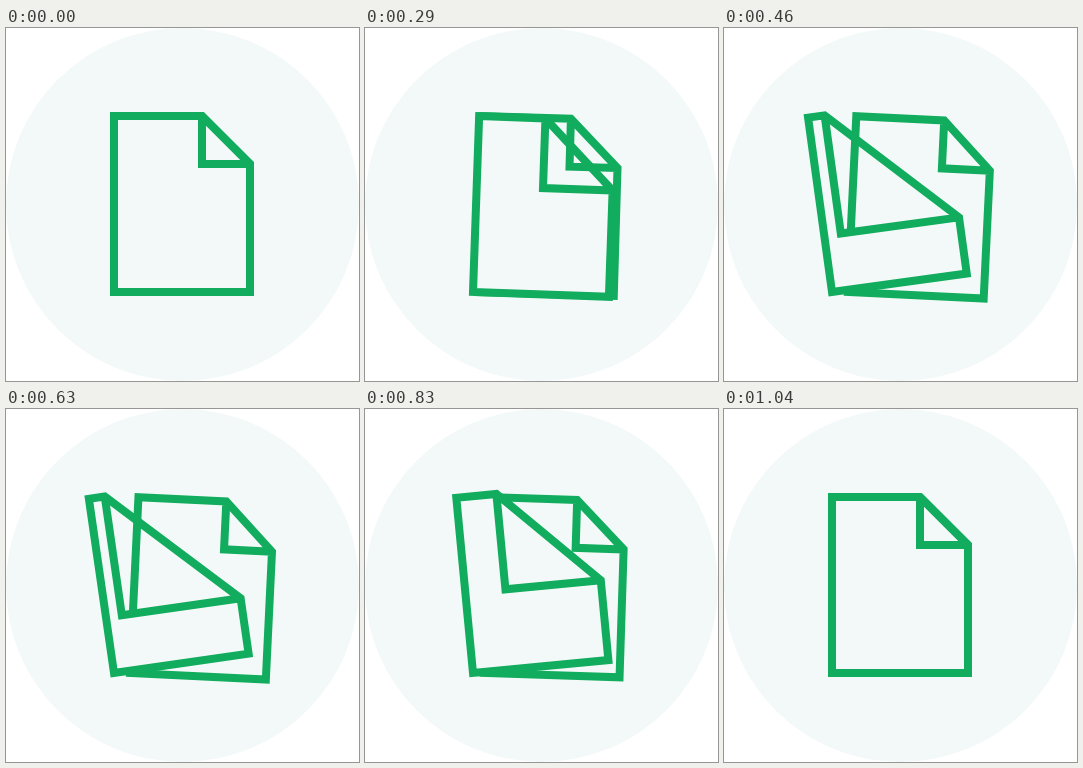
An HTML page for the animation above (1.18 s loop, 353x353 px).

```html
<!DOCTYPE html>
<html lang="en">
<head>
<meta charset="utf-8">
<title>Copy pages</title>
<style>
  html, body { margin: 0; width: 100%; height: 100%; overflow: hidden; background: #fff; }
  svg { display: block; width: 100vw; height: 100vh; }
  path { fill: #f3f9f8; stroke: #12ac5e; stroke-width: 8; stroke-miterlimit: 10; }
</style>
</head>
<body>
<svg viewBox="0 0 353 353">
  <circle cx="176.5" cy="176.5" r="176.5" fill="#f3f9f8"/>
  <path id="back"/>
  <path id="front"/>
</svg>
<script>
const LOOP = 1180, W = 136, H = 176, FOLD = 48;
const back = document.getElementById('back');
const front = document.getElementById('front');

// Eased progress from 0 to 1 between two times
function ease(t, from, to) {
  const u = Math.min(1, Math.max(0, (t - from) / (to - from)));
  return u * u * u * (u * (6 * u - 15) + 10);
}

// Motion advances in steps of about 41 ms, aligned to 10 ms
function stepTime(t) {
  const k = Math.floor((Math.floor(t / 10) - 12.5) / 4.14);
  return k < 0 ? 0 : 130 + 10 * Math.round(4.14 * k);
}

// The page's origin is its bottom left corner, which is also the pivot
function drawPage(page, x, angle, fold) {
  const fx = W - fold, fy = fold - H;
  page.setAttribute('d',
    `M0 0V${-H}H${fx}L${W} ${fy}V0Z M${fx} ${-H}V${fy}H${W}`);
  page.setAttribute('transform', `translate(${x} 264) rotate(${angle})`);
}

function draw() {
  const t = stepTime(performance.now() % LOOP);
  const open = ease(t, 88, 503);
  const stay = 1 - ease(t, 680, 1045);
  const lean = 2 * ease(t, 88, 250) - 10.2 * ease(t, 290, 495);
  drawPage(back, 108 + 16 * open * stay, 2.75 * ease(t, 88, 378) * stay, FOLD);
  drawPage(front, 108, lean * stay, FOLD + 72 * open * stay);
  requestAnimationFrame(draw);
}
draw();
</script>
</body>
</html>
```
